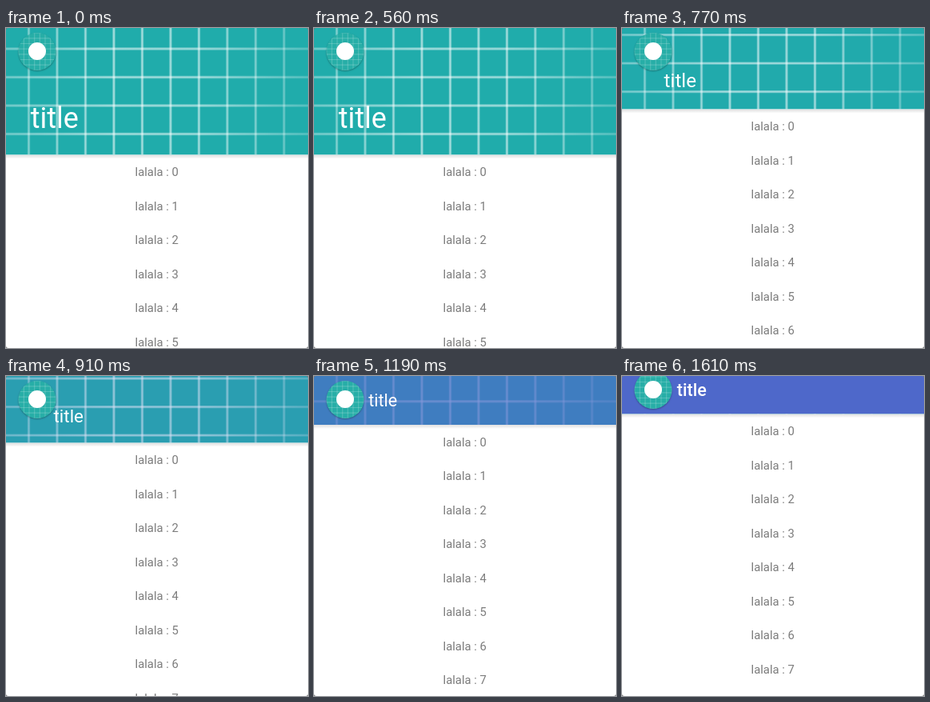
An HTML page with a canvas that plays this animation: 378x400 px, repeating every 1.68 s.

```html
<!DOCTYPE html>
<html lang="en">
<head>
<meta charset="utf-8">
<title>Collapsing toolbar</title>
<style>
  html, body { margin: 0; width: 100%; height: 100%; overflow: hidden; background: #fff; }
  canvas { display: block; }
</style>
</head>
<body>
<canvas id="stage" width="378" height="400"></canvas>
<script>
const ctx = document.getElementById('stage').getContext('2d');
const W = 378, H = 400, LOOP = 1680, STEP = 70;
const EXPANDED = 158.6, TOOLBAR = 59.4;
const TEAL = '#20acab', INDIGO = '#4e68ca';

// Scroll offset at each step of the fling, which begins at 560 ms.
const FLING_START = 560;
const FLING = [0, 24, 43, 57, 66.5, 75, 81.7, 87.5, 93, 97.5, 101.4, 104.6, 107.2, 109.2, 110.5, 111.2];

const clamp = v => Math.max(0, Math.min(1, v));
const mix = (a, b, p) => a + (b - a) * p;

function scrollAt(t) {
  const at = Math.max(0, (t - FLING_START) / STEP);
  const i = Math.min(Math.floor(at), FLING.length - 2);
  return mix(FLING[i], FLING[i + 1], clamp(at - i));
}

function line(x1, y1, x2, y2) {
  ctx.beginPath();
  ctx.moveTo(x1, y1);
  ctx.lineTo(x2, y2);
  ctx.stroke();
}

function disc(x, y, r, color) {
  ctx.beginPath();
  ctx.arc(x, y, r, 0, Math.PI * 2);
  ctx.fillStyle = color;
  ctx.fill();
}

function softText(text, x, y, color) {
  ctx.filter = 'blur(0.35px)';
  ctx.fillStyle = color;
  ctx.fillText(text, x, y);
  ctx.filter = 'none';
}

function drawGrid(offset) {
  const glow = ctx.createLinearGradient(0, 0, W, 0);
  glow.addColorStop(0, 'rgba(255,255,255,.22)');
  glow.addColorStop(0.35, 'rgba(255,255,255,.36)');
  glow.addColorStop(0.65, 'rgba(255,255,255,.34)');
  glow.addColorStop(1, 'rgba(255,255,255,.14)');
  ctx.strokeStyle = glow;
  // A wide and a narrow pass give each line a soft edge.
  for (const width of [3.4, 1.6]) {
    ctx.lineWidth = width;
    for (let x = 28.5; x < W; x += 35.5) line(x, 0, x, EXPANDED);
    for (let y = 26; y < EXPANDED + 40; y += 35.5) line(0, y - offset, W, y - offset);
  }
}

function drawHeader(height, scroll, scrim) {
  const shadow = ctx.createLinearGradient(0, height, 0, height + 5);
  shadow.addColorStop(0, 'rgba(0,0,0,.13)');
  shadow.addColorStop(1, 'rgba(0,0,0,0)');
  ctx.fillStyle = shadow;
  ctx.fillRect(0, height, W, 5);

  ctx.save();
  ctx.beginPath();
  ctx.rect(0, 0, W, height);
  ctx.clip();
  ctx.fillStyle = TEAL;
  ctx.fillRect(0, 0, W, height);
  drawGrid(scroll * 0.305);
  ctx.globalAlpha = scrim;
  ctx.fillStyle = INDIGO;
  ctx.fillRect(0, 0, W, height);
  ctx.restore();
}

function drawBadge(x, y) {
  ctx.save();
  ctx.shadowColor = 'rgba(0,0,0,.3)';
  ctx.shadowBlur = 2;
  ctx.shadowOffsetY = 1;
  disc(x, y, 23.5, '#27aea7');
  ctx.restore();

  ctx.save();
  ctx.beginPath();
  ctx.arc(x, y, 23.5, 0, Math.PI * 2);
  ctx.clip();
  ctx.strokeStyle = 'rgba(255,255,255,.18)';
  ctx.lineWidth = 1.2;
  for (let d = -23.3; d < 24; d += 6.66) {
    line(x + d, y - 24, x + d, y + 24);
    line(x - 24, y + d, x + 24, y + d);
  }
  ctx.restore();
  disc(x, y - 0.5, 11, '#fff');
}

function drawTitle(collapse, lift) {
  const size = mix(36, 21.6, 1 - (1 - collapse) ** 2);
  ctx.font = `${collapse === 1 ? 500 : 400} ${size}px Roboto, sans-serif`;
  ctx.textAlign = 'left';
  softText('title', mix(30.7, 68.8, collapse), mix(125.3, 36.5, collapse) + lift, '#fff');
}

function drawList(top) {
  ctx.font = '14.85px Roboto, sans-serif';
  ctx.textAlign = 'center';
  for (let i = 0, y = top + 26.7; y < H + 12; i++, y += 42.5) {
    softText(`lalala : ${i}`, 188.7, y, '#7c7c7c');
  }
}

function draw(t) {
  const scroll = scrollAt(t);
  const height = EXPANDED - scroll;
  const collapse = clamp(scroll / (EXPANDED - TOOLBAR));
  const lift = Math.min(0, height - TOOLBAR);
  const scrim = clamp((t - 735) / 620) ** 1.25;

  ctx.fillStyle = '#fff';
  ctx.fillRect(0, 0, W, H);
  drawList(height);
  drawHeader(height, scroll, scrim);
  drawBadge(39, 29.5 + lift);
  drawTitle(collapse, lift);

  // Rounded screen corners.
  ctx.beginPath();
  ctx.rect(0, 0, W, H);
  ctx.roundRect(0, 0, W, H, 3);
  ctx.fillStyle = '#777';
  ctx.fill('evenodd');
}

function tick() {
  const t = performance.now() % LOOP;
  draw(Math.floor(t / STEP) * STEP);
  requestAnimationFrame(tick);
}
tick();
</script>
</body>
</html>
```
